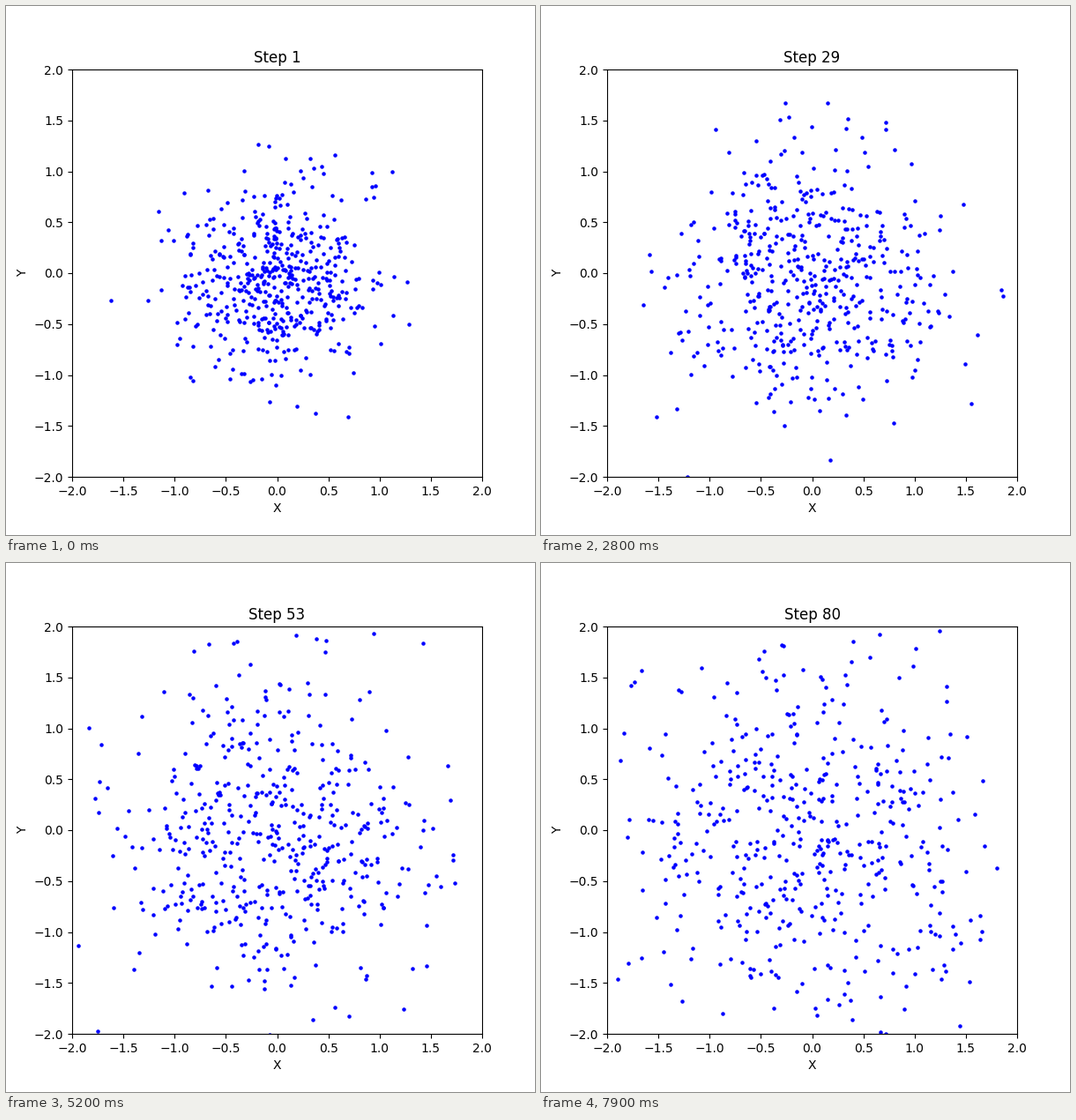
A matplotlib script that plays this animation: 600x600 px, repeating every 8 s.

```python
import numpy as np
import matplotlib.pyplot as plt
from matplotlib.animation import FuncAnimation

COUNT, STEPS = 500, 80
SPREAD = 0.5    # deviation of the starting cloud
STEP = 0.085    # deviation of one random step

rng = np.random.default_rng(7)

# Brownian paths: a normal cloud plus accumulated normal steps
start = rng.normal(0, SPREAD, (COUNT, 2))
moves = rng.normal(0, STEP, (STEPS, COUNT, 2))
moves[0] = 0
paths = start + np.cumsum(moves, axis=0)

fig, ax = plt.subplots(figsize=(6, 6), dpi=100)
ax.set(xlim=(-2, 2), ylim=(-2, 2), xlabel="X", ylabel="Y")
dots = ax.scatter(*paths[0].T, s=5, color="blue")
title = ax.set_title("Step 1")


def update(i):
    dots.set_offsets(paths[i])
    title.set_text(f"Step {i + 1}")
    return dots, title


anim = FuncAnimation(fig, update, frames=STEPS, interval=100,
                     repeat=True, repeat_delay=0, blit=False)
plt.show()
```
